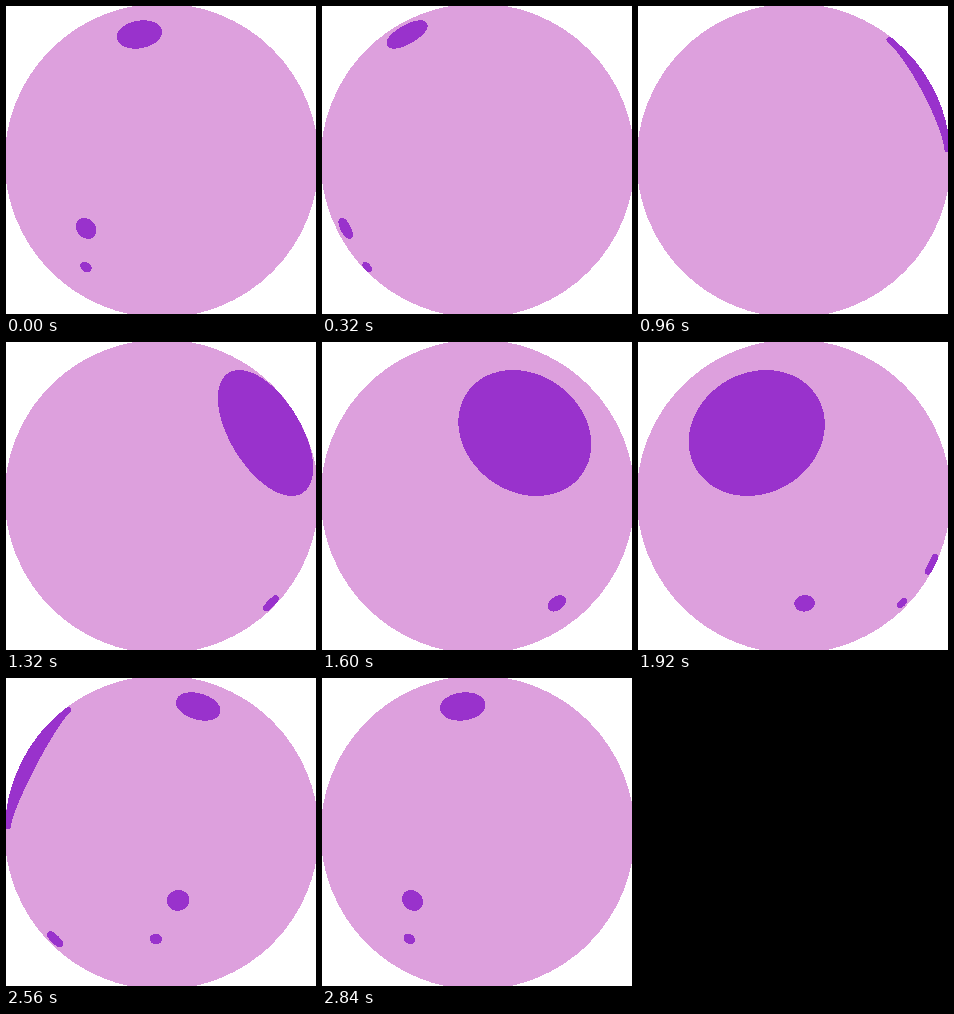
Write an HTML page that moves like this. It is 310 px wide and 308 px high and loops after 2.88 s.

```html
<!DOCTYPE html>
<html lang="en">
<head>
<meta charset="utf-8">
<title>Spotted rotating sphere</title>
<style>
  html, body { margin: 0; width: 100%; height: 100%; overflow: hidden; background: #fff; }
  svg { display: block; width: 100%; height: 100%; }
  circle, path { stroke-width: 6; stroke-linejoin: round; shape-rendering: crispEdges; }
  circle { fill: #dda0dd; stroke: #dda0dd; }
  path { fill: #9932cc; stroke: #9932cc; }
</style>
</head>
<body>
<svg viewBox="0 0 310 308"><circle cx="155.75" cy="154.5" r="154"/></svg>
<script>
const LOOP = 2880, STEP = 40, R = 154, CX = 155.75, CY = 154.5;
const rad = degrees => degrees * Math.PI / 180;
const svg = document.querySelector('svg');

// Round caps: latitude and longitude in degrees, radius in pixels.
const spots = [
  { lat: 27.3, lon: 222.5, r: 67.5 },
  { lat: 55.6, lon: -15, r: 19.8 },
  { lat: -26.2, lon: -33.2, r: 8.3 },
  { lat: -43.75, lon: -43, r: 3.1 },
  { lat: -44, lon: 245.6, r: 7.2 }
].map(spot => ({
  ...spot,
  path: svg.appendChild(document.createElementNS(svg.namespaceURI, 'path'))
}));

// Outline of the part of a cap that lies on the near hemisphere.
function capPath({ lat, lon, r }, turn) {
  const phi = rad(lat), lambda = rad(lon - turn);
  const nx = Math.cos(phi) * Math.sin(lambda);
  const ny = Math.sin(phi);
  const nz = Math.cos(phi) * Math.cos(lambda);
  const m = Math.hypot(nx, ny);
  const depth = Math.sqrt(R * R - r * r);
  const limit = -nz * depth / (m * r);
  if (limit >= 1) return '';

  const end = Math.acos(Math.max(-1, limit));
  const count = 72;
  const points = [];
  for (let i = 0; i <= count; i++) {
    const u = end * (2 * i / count - 1);
    const a = -r * Math.cos(u) * nz / m, b = r * Math.sin(u) / m;
    const x = depth * nx + a * nx - b * ny;
    const y = depth * ny + a * ny + b * nx;
    points.push(`${(CX + x).toFixed(2)} ${(CY - y).toFixed(2)}`);
  }
  const limb = limit > -1 ? `A${R} ${R} 0 0 1 ${points[0]}` : '';
  return `M${points.join('L')}${limb}Z`;
}

function draw() {
  const step = Math.floor(performance.now() % LOOP / STEP);
  const turn = step * STEP / LOOP * 360;
  for (const spot of spots) spot.path.setAttribute('d', capPath(spot, turn));
  requestAnimationFrame(draw);
}
draw();
</script>
</body>
</html>
```
